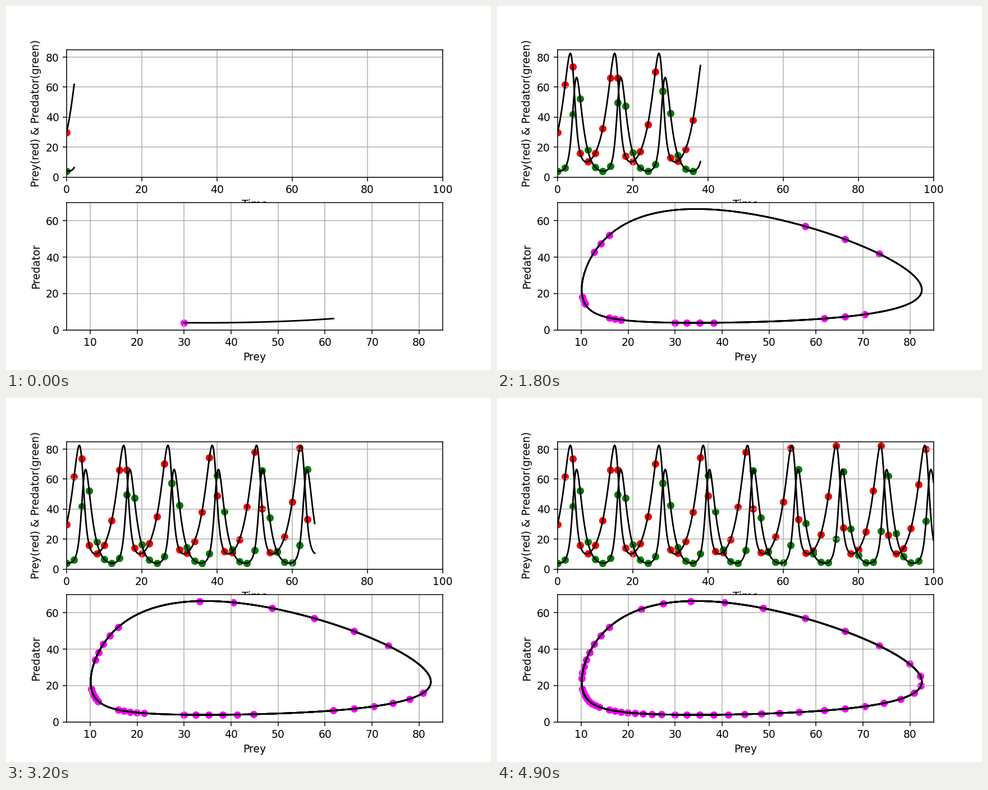
Write a matplotlib script that moves like this. It is 864x648 px and loops after 5000 ms.

```python
import numpy as np
import matplotlib.pyplot as plt
from matplotlib.animation import FuncAnimation

FRAMES = 50
INTERVAL = 100       # ms
SPAN = 2.0           # model time covered by one frame
STEPS = 100          # integration steps per frame

# Lotka-Volterra rates: prey growth, predation, predator death, conversion
A, B, C, D = 0.453, 0.0205, 0.790, 0.0229


def rates(state):
    prey, predator = state
    return np.array([prey * (A - B * predator), predator * (D * prey - C)])


def solve(start, dt, count):
    """Classic fourth-order Runge-Kutta."""
    states = [np.array(start, dtype=float)]
    for _ in range(count):
        s = states[-1]
        k1 = rates(s)
        k2 = rates(s + dt / 2 * k1)
        k3 = rates(s + dt / 2 * k2)
        k4 = rates(s + dt * k3)
        states.append(s + dt / 6 * (k1 + 2 * k2 + 2 * k3 + k4))
    return np.array(states)


time = np.linspace(0, FRAMES * SPAN, FRAMES * STEPS + 1)
prey, predator = solve((30, 4), SPAN / STEPS, FRAMES * STEPS).T

fig, (time_ax, phase_ax) = plt.subplots(2, 1, figsize=(6.4, 4.8), dpi=135)

time_ax.set(xlim=(0, 100), ylim=(0, 85), xlabel="Time",
            ylabel="Prey(red) & Predator(green)")
phase_ax.set(xlim=(5, 85), ylim=(0, 70), xlabel="Prey", ylabel="Predator")
for ax in (time_ax, phase_ax):
    ax.grid(True)

curves = [
    (time_ax, time, prey, "red"),
    (time_ax, time, predator, "green"),
    (phase_ax, prey, predator, "magenta"),
]

# One line piece per frame, so that overlapping laps of the orbit build up
pieces = [[] for _ in range(FRAMES)]
dots = []
for ax, x, y, color in curves:
    for i in range(FRAMES):
        part = slice(i * STEPS, (i + 1) * STEPS + 1)
        pieces[i] += ax.plot(x[part], y[part], color="black", visible=False)
    points = np.column_stack([x, y])[:-1:STEPS]
    dots.append((ax.scatter([], [], color=color), points))


def update(frame):
    for i, lines in enumerate(pieces):
        for line in lines:
            line.set_visible(i <= frame)
    for scatter, points in dots:
        scatter.set_offsets(points[:frame + 1])
    return []


anim = FuncAnimation(fig, update, frames=FRAMES, interval=INTERVAL,
                     init_func=lambda: update(0), repeat=True, repeat_delay=0)
plt.show()
```
